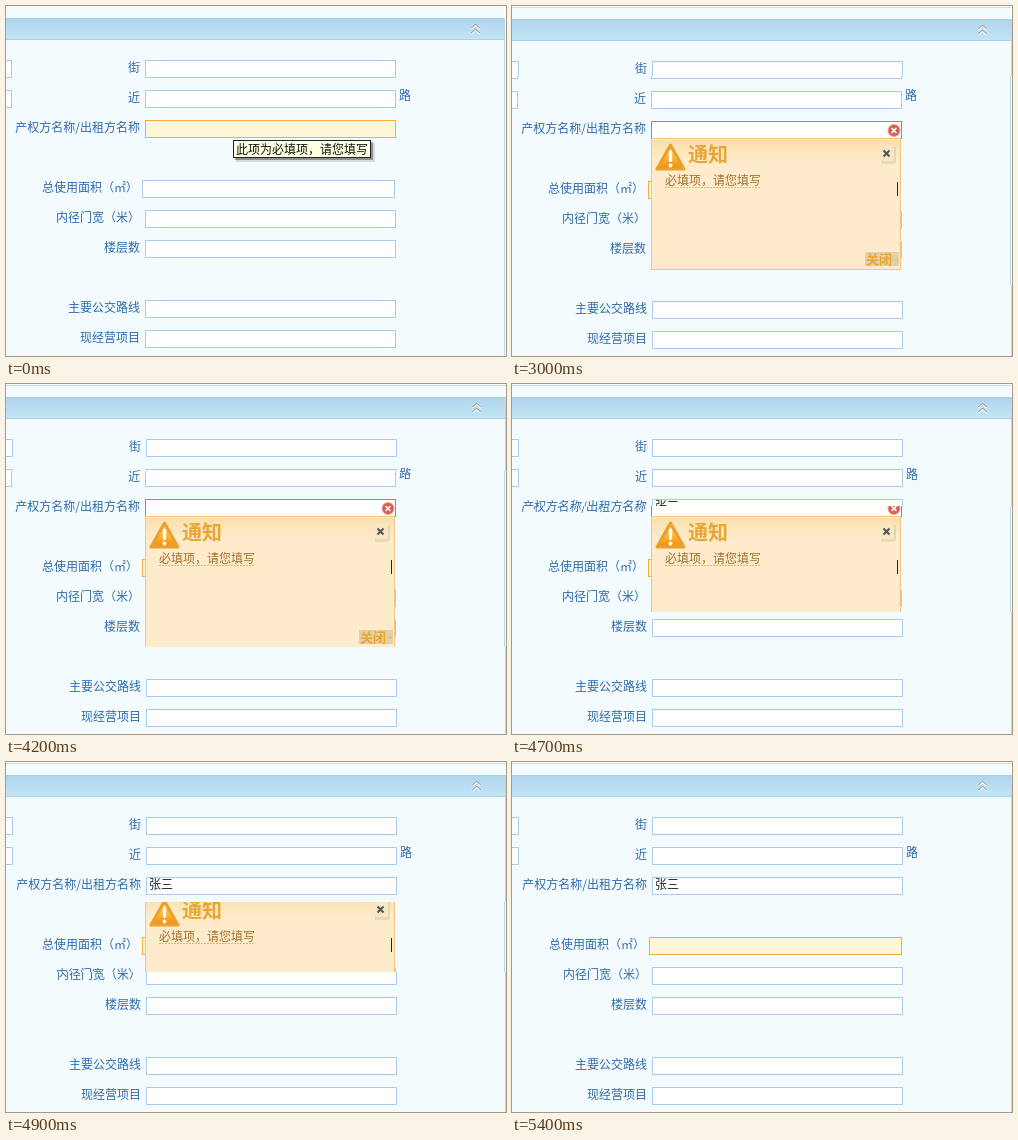
Write an HTML page that moves like this. It is 500 by 350 pixels and loops after 7800 ms.

```html
<!DOCTYPE html>
<html lang="zh-CN">
<head>
<meta charset="utf-8">
<title>表单验证</title>
<style>
  html, body { margin: 0; width: 100%; height: 100%; overflow: hidden; background: #fff; }
  svg { position: absolute; left: 0; top: 0; width: 500px; height: 350px; }
  text { font: 12px "Noto Sans CJK SC", "Noto Sans CJK JP", "Noto Sans CJK", sans-serif; }
  rect { shape-rendering: crispEdges; }
</style>
</head>
<body>
<svg id="filled" viewBox="0 0 500 350"></svg>
<svg id="warned" viewBox="0 0 500 350"></svg>
<svg id="empty" viewBox="0 0 500 350"></svg>
<svg width="0" height="0">
  <defs>
    <linearGradient id="header" x2="0" y2="1">
      <stop stop-color="#aed4ee"/><stop offset="1" stop-color="#c5e5f6"/>
    </linearGradient>
    <linearGradient id="notice" x2="0" y2="1">
      <stop stop-color="#fadfa9"/><stop offset="1" stop-color="#fdebcb"/>
    </linearGradient>
    <linearGradient id="amber" x2="0" y2="1">
      <stop stop-color="#ffd97a"/><stop offset=".55" stop-color="#fbb534"/><stop offset="1" stop-color="#f08c14"/>
    </linearGradient>
  </defs>
</svg>
<script>
const LOOP = 7800;
const BLUE = '#2f6bab';

const rect = (x, y, w, h, fill, extra = '') =>
  `<rect x="${x}" y="${y}" width="${w}" height="${h}" fill="${fill}" ${extra}/>`;
const path = (d, stroke, width, extra = '') =>
  `<path d="${d}" fill="none" stroke="${stroke}" stroke-width="${width}" ${extra}/>`;
// y is the vertical middle of the glyphs
const text = (x, y, str, fill, extra = '') =>
  `<text x="${x}" y="${y + 4.5}" fill="${fill}" ${extra}>${str}</text>`;
const label = (y, str, right = 135) => text(right, y, str, BLUE, 'text-anchor="end"');

const looks = {
  plain: ['#fff', '#a9cbee'],
  focus: ['#fff6da', '#f4ad3c'],
  error: ['#fff', '#e8695f']
};
function field(x, y, w, look = 'plain') {
  const [fill, stroke] = looks[look];
  return rect(x + .5, y + .5, w - 1, 17, fill, `stroke="${stroke}"`);
}

const rows = [
  [55, '街'], [85, '近'], [115, '产权方名称/出租方名称'], [175, '总使用面积（㎡）'],
  [205, '内径门宽（米）'], [235, '楼层数'], [295, '主要公交路线'], [325, '现经营项目']
];

function form(dx, dy, ownerLook, areaLook) {
  const fields = rows.map(([y, name]) => {
    const area = y === 175;
    const look = area ? areaLook : y === 115 ? ownerLook : 'plain';
    return label(y + 7, name, area ? 133 : 135) + field(area ? 137 : 140, y, area ? 253 : 251, look);
  }).join('');
  return rect(0, 0, 500, 350, '#fff') +
    `<g transform="translate(${dx} ${dy})">` +
    rect(0, 2, 499, 352, '#f3fbff') +
    (dy ? '' : rect(0, 1, 500, 1, '#d3dde2')) +
    rect(0, 13, 500, 22, 'url(#header)') +
    rect(0, 13, 500, 1, '#a9cee6') + rect(0, 34, 500, 1, '#abd3e8') +
    rect(499, 13, 1, 340, '#b5d9ec') +
    path('M466 23.5l4.5-4 4.5 4M466 28.5l4.5-4 4.5 4', '#fff', 2.4) +
    path('M466 23l4.5-4 4.5 4M466 28l4.5-4 4.5 4', '#93aabb', 1.3) +
    field(-20, 55, 27) + field(-20, 85, 27) + fields +
    text(394, dx && !dy ? 89 : 90, '路', BLUE) + '</g>';
}

const tooltip =
  rect(230, 137, 139, 19, '#000', 'opacity=".12"') +
  rect(229, 136, 138, 18, '#000', 'opacity=".35"') +
  rect(227.5, 134.5, 137, 17, '#ffffe1', 'stroke="#222"') +
  text(230, 143, '此项为必填项，请您填写', '#111');

const errorIcon =
  '<circle cx="382" cy="124.5" r="6" fill="#dc5b50" stroke="#f0a49c"/>' +
  path('M379.5 122l5 5m0-5l-5 5', '#fff', 1.7);

const warningIcon =
  '<path d="M158.5 139L172 163H145Z" fill="url(#amber)" stroke="#e9a02c" stroke-width="3" stroke-linejoin="round"/>' +
  path('M158.5 146v8.5', '#fff', 3.2, 'stroke-linecap="round"') +
  '<circle cx="158.5" cy="159.5" r="1.9" fill="#fff"/>';

const popup =
  rect(139.5, 132.5, 249, 131, '#fdebcb', 'stroke="#f1c77e"') +
  rect(140, 133, 248, 22, 'url(#notice)') +
  rect(140, 133, 248, 1, '#fdebc4') +
  warningIcon +
  text(176, 151, '通知', '#e9a535', 'style="font-size:20px;font-weight:700"') +
  rect(369, 141, 15, 17, '#d9cba8', 'rx="2" opacity=".55"') +
  rect(368, 140, 14, 15, '#f6e7c5', 'rx="2"') +
  path('M371.5 144.5l6 6m0-6l-6 6', '#555', 2) +
  text(153, 174, '必填项，请您填写', '#a2702f') +
  path('M153 181.5H249', '#d9b77c', 1, 'stroke-dasharray="2 1"') +
  rect(385, 176, 1, 14, '#222') +
  rect(353, 246, 34, 14, '#e3d0a6') +
  text(354, 253, '关闭', '#eba332', 'style="font-size:13px;font-weight:700"') +
  rect(383, 253, 3, 1, '#e5b25c');

const [empty, warned, filled] = ['empty', 'warned', 'filled'].map(id => document.getElementById(id));
empty.innerHTML = form(-1, -1, 'focus', 'plain') + tooltip;
warned.innerHTML = form(-1, 0, 'error', 'focus') + errorIcon + popup;
filled.innerHTML = form(0, 0, 'plain', 'focus') + text(143, 122, '张三', '#222');

// Each step: [start time, value], held until the next one
function playSteps(element, property, steps) {
  const frames = steps.map(([time, value]) =>
    ({ offset: time / LOOP, [property]: value, easing: 'step-end' }));
  frames.push({ ...frames[frames.length - 1], offset: 1 });
  element.animate(frames, { duration: LOOP, iterations: Infinity });
}

playSteps(empty, 'opacity', [[0, 1], [2000, 0]]);
// The warning closes like a blind towards the middle of the stage
playSteps(warned, 'clipPath',
  [[0, 70], [4200, 87], [4500, 105], [4700, 122], [4900, 140], [5100, 157], [5400, 175]]
    .map(([time, edge]) => [time, `inset(${edge}px 0px)`]));
</script>
</body>
</html>
```
